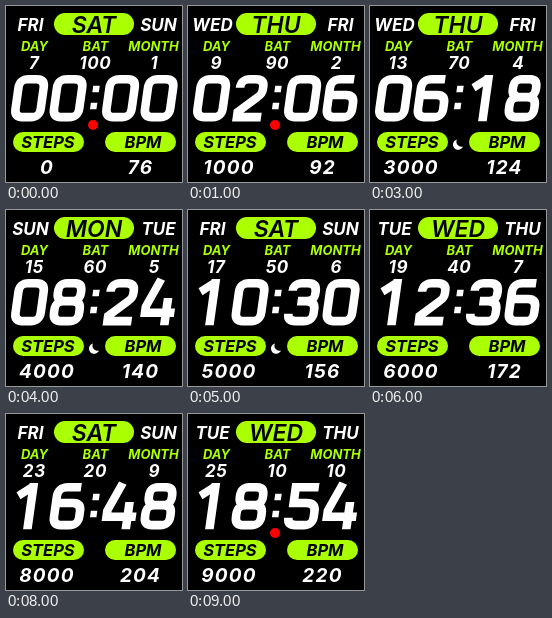
Recreate the animation shown at these times as an HTML page. Size 176x176 px, loop 10 s.

```html
<!DOCTYPE html>
<html lang="en">
<head>
<meta charset="utf-8">
<title>Watch face</title>
<style>
  html, body { margin: 0; height: 100%; overflow: hidden; background: #000; }
  svg { display: block; width: 100vw; height: 100vh; }
  text { font-family: Inter, "Open Sans", sans-serif; font-weight: 700; font-style: italic; text-anchor: middle; fill: #fff; }
  .lime { fill: #af0; }
  .side { font-size: 17px; }
  .today { font-size: 23px; font-weight: 600; fill: #000; }
  .label { font-size: 13px; fill: #af0; }
  .value { font-size: 17px; letter-spacing: .6px; }
  .badge { font-size: 16.5px; fill: #000; }
  .total { font-size: 19px; letter-spacing: 1.2px; }
  .digit { fill: none; stroke: #fff; stroke-width: 8.2; }
</style>
</head>
<body>
<svg viewBox="0 0 176 176">
  <rect class="lime" x="48" y="7" width="80" height="22" rx="11"/>
  <rect class="lime" x="7" y="126" width="71" height="20" rx="10"/>
  <rect class="lime" x="99" y="126" width="71" height="20" rx="10"/>

  <text id="yesterday" class="side" x="24.5" y="24.5"></text>
  <text id="today" class="today" x="88" y="26.5"></text>
  <text id="tomorrow" class="side" x="152.5" y="24.5"></text>

  <text class="label" x="28.5" y="45">DAY</text>
  <text class="label" x="89.5" y="45">BAT</text>
  <text class="label" x="147.5" y="45">MONTH</text>
  <text id="day" class="value" x="28.3" y="63"></text>
  <text id="battery" class="value" x="89.3" y="63"></text>
  <text id="month" class="value" x="148.3" y="63"></text>

  <!-- The clock is slanted around its baseline -->
  <g id="clock" role="img" transform="translate(0 110) skewX(-8) translate(0 -36.7)">
    <path class="digit" transform="translate(8.5) scale(1.05)"/>
    <path class="digit" transform="translate(47) scale(1.05)"/>
    <path fill="#fff" d="M83 6.5h6.5v6.5h-6.5zM83 23.5h6.5v6.5h-6.5z"/>
    <path class="digit" transform="translate(99.5) scale(1.05)"/>
    <path class="digit" transform="translate(138) scale(1.05)"/>
  </g>

  <circle id="link" cx="87" cy="119" r="5" fill="#f00"/>
  <path id="moon" fill="#fff" d="M87 133.5A5.2 5.2 0 1 0 93 140.5A5 5 0 0 1 87 133.5Z"/>

  <text class="badge" x="42" y="142">STEPS</text>
  <text class="badge" x="137" y="142">BPM</text>
  <text id="steps" class="total" x="41" y="168"></text>
  <text id="bpm" class="total" x="134.5" y="168"></text>
</svg>
<script>
// Centre lines of the clock digits in a 24 x 36 box
const DIGITS = {
  0: 'M8 0H16Q24 0 24 8V28Q24 36 16 36H8Q0 36 0 28V8Q0 0 8 0Z',
  1: 'M0 8L13 -1M13 -4V40',
  2: 'M1 8Q1 0 9 0H15Q23 0 23 7V10Q23 14 19 17L2 31V36H25',
  3: 'M1 7Q1 0 9 0H15Q23 0 23 8V10Q23 17 15 17H7M15 17Q24 17 24 25V28Q24 36 16 36H8Q0 36 0 29',
  4: 'M11 -4L0 22V28H28M20 14V40',
  5: 'M25 0H3V15H15Q24 15 24 23V28Q24 36 16 36H8Q0 36 0 29',
  6: 'M22 0H9Q0 0 0 9V28Q0 36 8 36H16Q24 36 24 28V23Q24 15 16 15H0',
  8: 'M8 0H16Q23 0 23 8V9Q23 17 15 17H9Q1 17 1 9V8Q1 0 8 0ZM8 17H16Q24 17 24 25V28Q24 36 16 36H8Q0 36 0 28V25Q0 17 8 17Z'
};
const WEEKDAYS = ['SUN', 'MON', 'TUE', 'WED', 'THU', 'FRI', 'SAT'];
const STEP_MS = 1000, STEP_COUNT = 10;

const byId = id => document.getElementById(id);
const clockDigits = document.querySelectorAll('.digit');
const twoDigits = n => String(n).padStart(2, '0');

function show(step) {
  const day = 7 + 2 * step;
  const weekday = new Date(2023, step, day).getDay();
  const texts = {
    yesterday: WEEKDAYS[(weekday + 6) % 7],
    today: WEEKDAYS[weekday],
    tomorrow: WEEKDAYS[(weekday + 1) % 7],
    day,
    battery: 100 - 10 * step,
    month: step + 1,
    steps: 1000 * step,
    bpm: 76 + 16 * step
  };
  for (const id in texts) byId(id).textContent = texts[id];

  const time = twoDigits(2 * step) + twoDigits(6 * step);
  clockDigits.forEach((path, i) => path.setAttribute('d', DIGITS[time[i]]));
  byId('clock').setAttribute('aria-label', time.slice(0, 2) + ':' + time.slice(2));

  // Status cycles: no link, quiet, plain
  const status = Math.floor(step / 3) % 3;
  byId('link').style.display = status === 0 ? '' : 'none';
  byId('moon').style.display = status === 1 ? '' : 'none';
}

let shown = -1;
function tick() {
  const step = Math.floor(performance.now() / STEP_MS) % STEP_COUNT;
  if (step !== shown) show(shown = step);
  requestAnimationFrame(tick);
}
tick();
</script>
</body>
</html>
```
